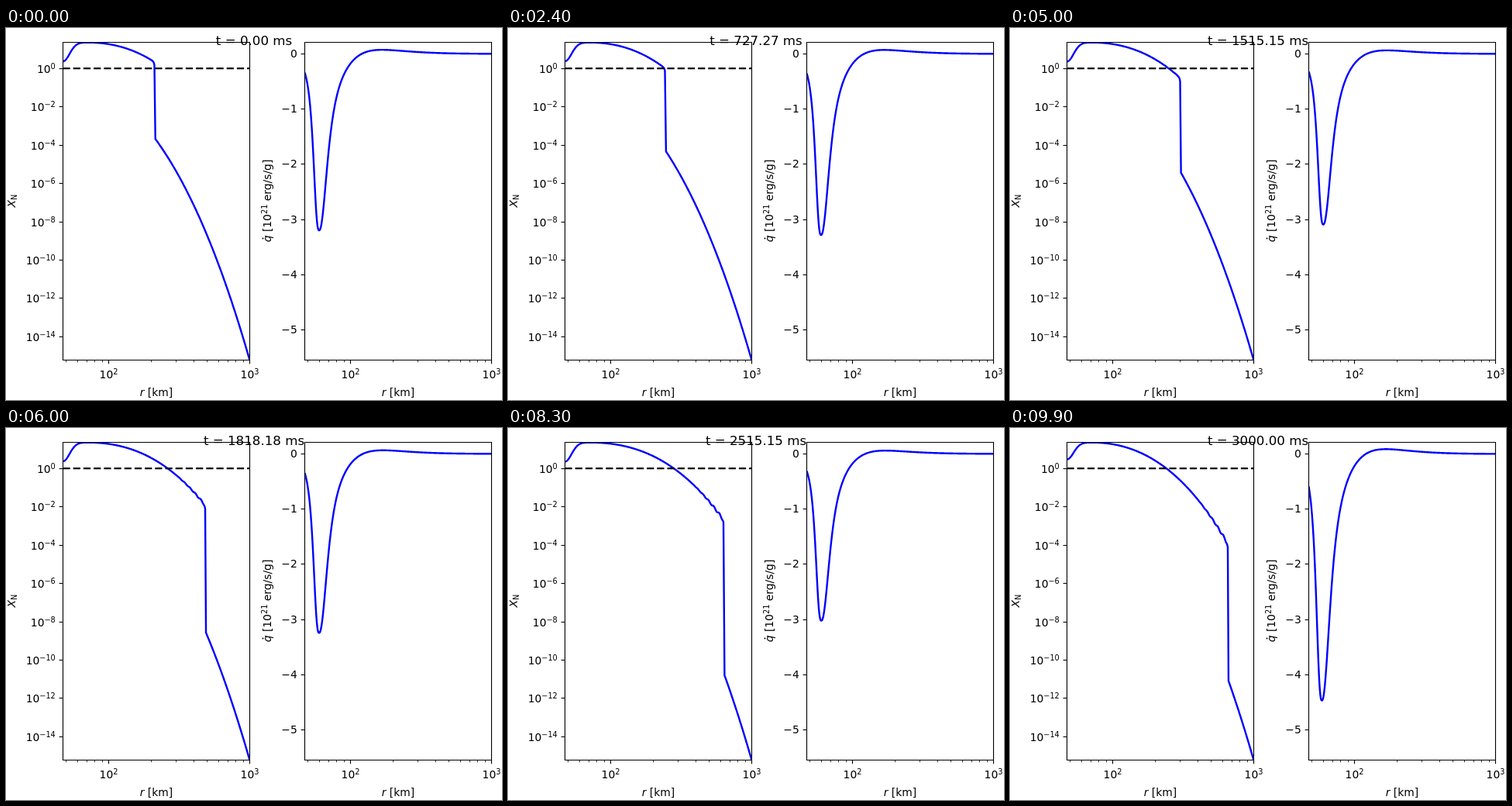
These frames come from a looping animation (640x480 px, 10 s). An HTML page:

```html
<!DOCTYPE html>
<html lang="en">
<head>
<meta charset="utf-8">
<title>Radial profiles</title>
<style>
  html, body { margin: 0; width: 100%; height: 100%; overflow: hidden; background: #fff; }
  svg { display: block; width: 640px; height: 480px; }
  text { font: 13.89px "DejaVu Sans", sans-serif; fill: #000; white-space: pre; }
  .title { font-size: 16.67px; }
  .small { font-size: 9.72px; }
  .it { font-style: italic; }
  .end { text-anchor: end; }
  .mid { text-anchor: middle; }
  .axis { fill: none; stroke: #000; stroke-width: 1.11; }
  .minor { stroke-width: .83; }
  .curve { fill: none; stroke: #00f; stroke-width: 2.4; stroke-linejoin: round; }
  .unity { stroke: #000; stroke-width: 2.4; stroke-dasharray: 9.2 4; }
</style>
</head>
<body>
<svg viewBox="0 0 640 480">
  <defs>
    <clipPath id="boxL"><rect x="73" y="18" width="241" height="410"/></clipPath>
    <clipPath id="boxR"><rect x="385" y="18" width="241" height="410"/></clipPath>
  </defs>
  <g transform="translate(.5 .5)">
    <g clip-path="url(#boxL)">
      <path id="mass" class="curve"/>
      <path class="unity" d="M73 51.6H314"/>
    </g>
    <g clip-path="url(#boxR)"><path id="heat" class="curve"/></g>
    <g id="axes"></g>
  </g>
  <g id="labels">
    <text class="mid" transform="translate(12 223) rotate(-90)"><tspan class="it">X</tspan><tspan class="small" dy="2.2">N</tspan></text>
    <text class="mid" transform="translate(342 223) rotate(-90)"><tspan class="it">q</tspan> [10<tspan class="small" dy="-5.3">21</tspan><tspan dy="5.3"> erg/s/g]</tspan></text>
    <circle cx="331.5" cy="271.5" r="1"/>
  </g>
  <text id="clock" class="title mid" x="320" y="22"></text>
</svg>
<script>
const $ = id => document.getElementById(id);
const LEFT = 73, RIGHT = 314, BOTTOM = 428, SHIFT = 312;
const FRAMES = 100, STEP = 100, END_TIME = 3000;

// Axes
const logX = r => RIGHT - 182 * (3 - Math.log10(r));
const power = n => `10<tspan class="small" dy="-5.3">${String(n).replace("-", "\u2212")}</tspan>`;
const label = (cls, x, y, body) => `<text class="${cls}" x="${x}" y="${y}">${body}</text>`;
const line = (d, cls = "") => `<path class="axis ${cls}" d="${d}"/>`;

function drawAxes() {
  let axes = "", labels = "";
  for (const dx of [0, SHIFT]) {
    axes += line(`M${LEFT + dx} 18H${RIGHT + dx}V${BOTTOM}H${LEFT + dx}Z`);
    for (const decade of [10, 100]) {
      for (let i = decade === 10 ? 5 : 2; i < 10; i++) {
        axes += line(`M${Math.round(logX(i * decade)) + dx} ${BOTTOM}v2.8`, "minor");
      }
    }
    for (const n of [2, 3]) {
      const x = logX(10 ** n) + dx;
      axes += line(`M${x} ${BOTTOM}v4.9`);
      labels += label("mid", x + .5, 452, power(n));
    }
    labels += label("mid", 194 + dx, 475, '<tspan class="it">r</tspan> [km]');
  }
  for (let i = 0; i < 8; i++) {
    const y = Math.round(52 + i * 49.4);
    axes += line(`M${LEFT} ${y}h-4.9`);
    labels += label("end", 63.8, y + 6, power(-2 * i));
  }
  for (let i = 0; i < 6; i++) {
    const y = Math.round(33 + i * 71.2);
    axes += line(`M${LEFT + SHIFT} ${y}h-4.9`);
    labels += label("end", 375.8, y + 5, i ? "\u2212" + i : "0");
  }
  $("axes").innerHTML = axes;
  $("labels").insertAdjacentHTML("beforeend", labels);
}

const clamp = t => Math.min(1, Math.max(0, t));
const smooth = t => t * t * (3 - 2 * t);
const bell = t => Math.exp(-t * t);
const pole = (t, p) => 1 / (1 + t ** p);

// Depth of the cooling dip in pixels, by frame; the rest follows from it
const DEPTHS = [[0, 228], [24, 234], [41, 251], [50, 220.5], [69, 241], [83, 215.5], [99, 318.5]];

function depthAt(n) {
  const i = DEPTHS.findIndex(key => key[0] > n);
  const [[n0, d0], [n1, d1]] = DEPTHS.slice(i < 0 ? -2 : i - 1).slice(0, 2);
  return d0 + (d1 - d0) * (n - n0) / (n1 - n0);
}

function plot(from, to, step, f) {
  let d = "";
  for (let x = from; x <= to; x += step) d += `${d ? "L" : "M"}${x.toFixed(2)} ${f(x).toFixed(2)}`;
  return d;
}

// The shock creeps outwards, then bursts open to a wide plateau
function massPath(n, depth) {
  const open = smooth(clamp((n - 46) / 23));
  const shock = 192.5 + .46 * Math.min(n, 50) + 64 * open + .025 * (depth - 240);
  const rise = 24.3 - .028 * (depth - 230);
  const bend = .00295 + 8.4e-6 * (depth - 241) + .00063 * (1 - open);
  const edge = shock - .9;

  const head = x => {
    const d = Math.max(0, x - 105);
    const ripple = 1.7 * open * clamp(1 - (shock - x) / 40);
    return 18.2 + rise * bell((x - LEFT) / 12)
      + (bend + 8e-6 * (x - 200)) * d * d
      + ripple * Math.sin(2 * Math.PI * (x - shock + 5) / 7)
      + 6 * Math.exp((x - edge) / .8);
  };
  const tail = x => {
    const u = x - 193;
    return 143.7 + u * (1.38 + u * (.00668 + u * 1.12e-5));
  };
  return plot(LEFT, edge, .5, head) + plot(shock, RIGHT + 2, 1, tail).replace("M", "L");
}

// Steep cooling dip with a shallow heating bump behind it
function heatPath(n, depth) {
  const centre = 403.6 - .018 * (depth - 230);
  const gain = .048 - .004 * clamp(n / 70);
  return plot(LEFT + SHIFT, RIGHT + SHIFT, .5, x => {
    const u = x - centre;
    const dip = u < 0 ? pole(-u / 8.5, 2.7) : pole(u / 13.4, 2.14);
    const bump = u > 0 ? gain * bell(Math.log(u / 64) / .68) : 0;
    return 32.6 + depth * (dip - bump);
  });
}

let shown = -1;
function draw() {
  const n = Math.floor(performance.now() / STEP) % FRAMES;
  if (n !== shown) {
    shown = n;
    const depth = depthAt(n);
    $("mass").setAttribute("d", massPath(n, depth));
    $("heat").setAttribute("d", heatPath(n, depth));
    $("clock").textContent = `t = ${(n * END_TIME / (FRAMES - 1)).toFixed(2)} ms`;
  }
  requestAnimationFrame(draw);
}
drawAxes();
draw();
</script>
</body>
</html>
```
